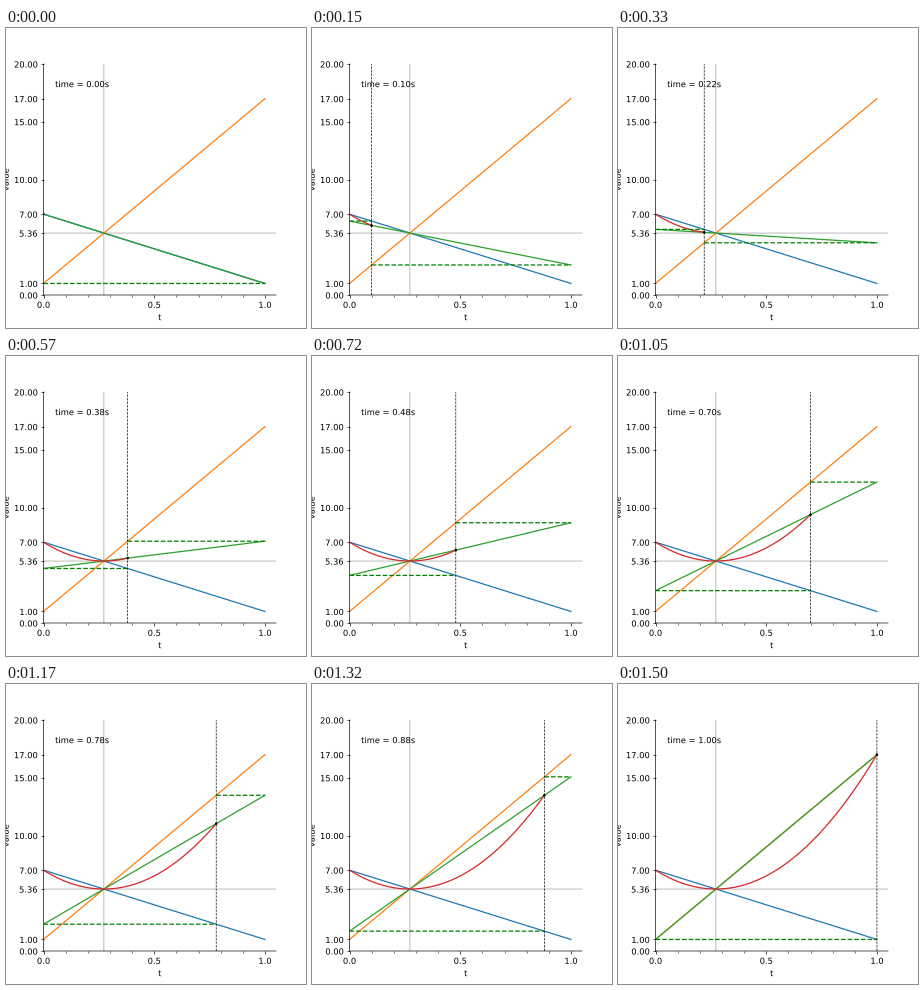
A matplotlib script that plays this animation: 300x300 px, repeating every 1530 ms.

```python
import numpy as np
import matplotlib.pyplot as plt
from matplotlib.animation import FuncAnimation
from matplotlib.patheffects import Normal
from matplotlib.ticker import AutoMinorLocator, FormatStrFormatter

FRAMES = 51
INTERVAL = 30

# Unsnapped lines and text drawn as outlines give soft, sub-pixel edges.
plt.rcParams.update({
    "font.family": "DejaVu Sans",
    "path.snap": False,
    "path.effects": [Normal()],
})
HAIRLINE = dict(color="k", lw=0.8, path_effects=[Normal(offset=(0.36, -0.36))])


def falling(t):
    return 7 - 6 * t


def rising(t):
    return 1 + 16 * t


def blend(t):
    return (1 - t) * falling(t) + t * rising(t)


cross_t = 6 / 22
cross_y = falling(cross_t)
ends = np.array([0.0, 1.0])

fig, ax = plt.subplots(figsize=(5, 5), dpi=60)
ax.set(xlim=(0, 1.05), ylim=(0, 20), xlabel="t", ylabel="value")
ax.spines[["top", "right"]].set_visible(False)
for side in ("left", "bottom"):
    ax.spines[side].set_path_effects(HAIRLINE["path_effects"])
ax.set_xticks([0, 0.5, 1])
ax.xaxis.set_minor_locator(AutoMinorLocator(5))
ax.set_yticks([0, 1, cross_y, 7, 10, 15, 17, 20])
ax.yaxis.set_major_formatter(FormatStrFormatter("%.2f"))

# The guides' dots are finer than a pixel, so they read as a pale line.
ax.axhline(cross_y, alpha=0.4, **HAIRLINE)
ax.axvline(cross_t, alpha=0.4, **HAIRLINE)

ax.plot(ends, falling(ends), "C0")
ax.plot(ends, rising(ends), "C1")
chord, = ax.plot([], [], "C2")
curve, = ax.plot([], [], "C3")
left, = ax.plot([], [], "g--")
right, = ax.plot([], [], "g--")
cursor = ax.axvline(0, ls="--", **HAIRLINE)
dot, = ax.plot([], [], "k.", ms=4)
label = ax.text(0.05, 0.9, "", transform=ax.transAxes)


def update(i):
    t = i / (FRAMES - 1)
    a, b = falling(t), rising(t)
    path = np.linspace(0, t, i + 1)
    chord.set_data(ends, [a, b])
    curve.set_data(path, blend(path))
    left.set_data([0, t], [a, a])
    right.set_data([t, 1], [b, b])
    cursor.set_xdata([t, t])
    dot.set_data([t], [blend(t)])
    label.set_text(f"time = {t:.2f}s")
    return chord, curve, left, right, cursor, dot, label


anim = FuncAnimation(fig, update, frames=FRAMES, interval=INTERVAL,
                     repeat=True, repeat_delay=0)
plt.show()
```
